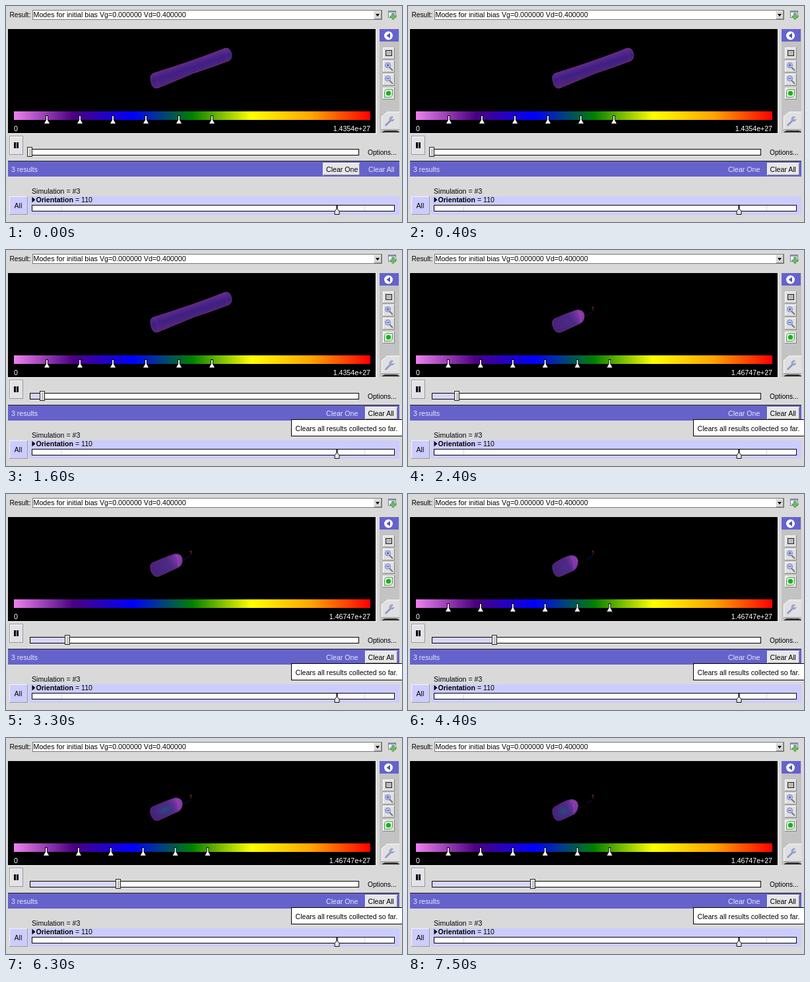
Recreate the animation shown at these times as an HTML page. Size 600 px wide and 328 px high, loop 8000 ms.

```html
<!DOCTYPE html>
<html lang="en">
<head>
<meta charset="utf-8">
<title>Simulation result viewer</title>
<style>
html, body { margin: 0; width: 100%; height: 100%; overflow: hidden; background: #d9d9d9; }
svg { display: block; }
text { font-family: "Liberation Sans", Arial, sans-serif; font-size: 10.6px; fill: #000; }
.px { shape-rendering: crispEdges; }
.small { font-size: 10.2px; }
.light { fill: #e6e6ff; }
.white { fill: #fff; }
.right { text-anchor: end; }
.line { fill: none; stroke: #000; }

/* Hard changes on one shared 8 s clock */
.step { animation: 8s step-end infinite; }
.knob { animation-name: knob; }
.one { animation-name: one; }
.all { animation-name: all; }
.tip { animation-name: tip; }
.rod, .first { animation-name: first; }
.later { animation-name: later; }
.marks { animation-name: marks; }
.long { animation-name: long; }
.short { animation-name: short; }
.teal { animation-name: teal; }

@keyframes knob {
  0% { transform: translateX(0); }
  11.25% { transform: translateX(19px); }
  23.75% { transform: translateX(38px); }
  35% { transform: translateX(57px); }
  45% { transform: translateX(76px); }
  53.75% { transform: translateX(95px); }
  65% { transform: translateX(115px); }
  76.25% { transform: translateX(134px); }
  87.5%, 100% { transform: translateX(153px); }
}
@keyframes one { 0% { visibility: visible; } 5%, 100% { visibility: hidden; } }
@keyframes all { 0% { visibility: hidden; } 5%, 100% { visibility: visible; } }
@keyframes tip { 0% { visibility: hidden; } 11.25%, 100% { visibility: visible; } }
@keyframes first { 0% { visibility: visible; } 23.75%, 100% { visibility: hidden; } }
@keyframes later { 0% { visibility: hidden; } 23.75%, 100% { visibility: visible; } }
@keyframes marks {
  0% { visibility: hidden; }
  23.75% { visibility: visible; }
  35% { visibility: hidden; }
  45%, 100% { visibility: visible; }
}
@keyframes long {
  0% { visibility: hidden; }
  23.75% { visibility: visible; }
  45% { visibility: hidden; }
  65% { visibility: visible; }
  87.5%, 100% { visibility: hidden; }
}
@keyframes short {
  0% { visibility: hidden; }
  45% { visibility: visible; }
  65% { visibility: hidden; }
  87.5%, 100% { visibility: visible; }
}
@keyframes teal { 0% { opacity: .2; } 65%, 100% { opacity: .8; } }
</style>
</head>
<body>
<svg width="600" height="328" viewBox="0 0 600 328">
<defs>
  <linearGradient id="rainbow">
    <stop stop-color="#ee82ee"/>
    <stop offset=".1667" stop-color="#4b0082"/>
    <stop offset=".3333" stop-color="#00f"/>
    <stop offset=".5" stop-color="#008000"/>
    <stop offset=".6667" stop-color="#ff0"/>
    <stop offset=".8333" stop-color="#ffa500"/>
    <stop offset="1" stop-color="#f00"/>
  </linearGradient>
  <linearGradient id="skin" gradientUnits="userSpaceOnUse" x1="277" y1="83" x2="284" y2="104">
    <stop stop-color="#642a8c"/>
    <stop offset=".5" stop-color="#3d2084"/>
    <stop offset="1" stop-color="#54237c"/>
  </linearGradient>
  <linearGradient id="shell" x1="0" y1=".7" x2="1" y2=".3">
    <stop stop-color="#472078"/>
    <stop offset=".6" stop-color="#502587"/>
    <stop offset="1" stop-color="#8e3cae"/>
  </linearGradient>
  <radialGradient id="core">
    <stop stop-color="#1b5a78"/>
    <stop offset="1" stop-color="#2b3b80" stop-opacity="0"/>
  </radialGradient>
  <path id="mark" d="M-.9-11.500h1.800v6L4 0h-8L-.9-5.500z" fill="#fff" stroke="#000" stroke-width="1.800" paint-order="stroke"/>
  <g id="raised" class="px">
    <path d="M0 0H17V17H0z" fill="#e0e0e0"/>
    <path d="M0 17V0H17" fill="none" stroke="#fff"/>
    <path d="M0 17H17V0" fill="none" stroke="#858585"/>
  </g>
  <g id="lens">
    <path d="M10 10l5 5" stroke="#777" stroke-width="2"/>
    <circle cx="7.500" cy="7" r="4" fill="#bcc6f2" stroke="#7780b8"/>
    <path d="M5.500 7h4" stroke="#4f5bac" stroke-width="1.200"/>
  </g>
  <g id="wisp" fill="none">
    <path d="M271 99l7-4 3-2" stroke="#1c1c80" stroke-dasharray="2 1"/>
    <path d="M278.500 87.500l2-1 .5 3-1.500 2" stroke="#9a4712" stroke-width=".9"/>
  </g>
</defs>

<rect width="600" height="328" fill="#d9d9d9"/>

<!-- Result chooser -->
<text class="small" x="5.500" y="17">Result:</text>
<g class="px">
  <rect x="40.500" y="6.500" width="529" height="14" fill="#fff" stroke="#777"/>
  <rect x="558" y="7" width="10" height="13" fill="#d9d9d9"/>
  <path d="M557.500 20V7.500H568" fill="none" stroke="#eee"/>
  <path d="M558 19.500H568.500V7" fill="none" stroke="#888"/>
</g>
<path d="M560 12h6l-3 4z"/>
<text x="41.500" y="17" font-size="10.700" style="font-size:10.7px">Modes for initial bias Vg=0.000000 Vd=0.400000</text>
<rect x="579.500" y="7.500" width="11" height="10" fill="#fff" stroke="#777c9c"/>
<path d="M580 9h10" stroke="#9298c8" stroke-width="2"/>
<path d="M584.500 11h4v4h3.500l-5.500 6-5.500-6h3.500z" fill="#6cbb60" stroke="#3a8a38" stroke-width=".7"/>

<!-- Viewer -->
<rect x="3" y="35" width="557" height="158"/>
<path class="px" d="M3 193.500H560.500V35" fill="none" stroke="#f4f4f4"/>

<g class="step rod">
  <path d="M224 102Q256 92 283 82.500Q310 73 331 64.500Q339 62 341.500 72Q343 80 338 83Q312 93 284 102Q258 113 230 124.500Q222 127 219.500 114Q217 104 224 102Z" fill="url(#skin)" stroke="#74357f" stroke-width=".9"/>
  <path d="M331 66Q336 73 335 83M225 103Q231 112 231 123" fill="none" stroke="#7c3a9c" stroke-opacity=".35"/>
</g>
<g class="step long">
  <path d="M222 104.500Q244 95 256 91Q265 90 267 98Q268 107 262 111L231 125Q223 127 219.500 116Q217 107 222 104.500Z" fill="url(#shell)" stroke="#66327c" stroke-width=".9"/>
  <ellipse class="step teal" cx="241" cy="109" rx="19" ry="10" fill="url(#core)" transform="rotate(-21 241 109)"/>
  <path d="M257 93Q263 99 261 109" fill="none" stroke="#a84cc0" stroke-opacity=".4" stroke-width="3"/>
  <path d="M267 101l5-2" stroke="#5c1818" stroke-dasharray="1 1"/>
  <use href="#wisp"/>
</g>
<g class="step short">
  <path d="M222 105Q236 96 246 93.500Q256 92.500 257.500 101Q258 110 252 115.500L231 125Q223 127.500 220 117Q217 108 222 105Z" fill="url(#shell)" stroke="#66327c" stroke-width=".9"/>
  <ellipse class="step teal" cx="236" cy="111" rx="16" ry="11" fill="url(#core)" transform="rotate(-21 236 111)"/>
  <path d="M247 95.500Q254 103 251.500 113.500" fill="none" stroke="#a250b8" stroke-opacity=".35" stroke-width="3"/>
  <path d="M259 107l9-4" stroke="#501414" stroke-dasharray="1 2"/>
  <use href="#wisp"/>
</g>

<rect class="px" x="12" y="160" width="540" height="13" fill="url(#rainbow)"/>
<g id="early" class="step first"></g>
<g id="late" class="step marks"></g>
<text class="white" x="12" y="190">0</text>
<text class="white right step first" x="552" y="190">1.4354e+27</text>
<text class="white right step later" x="552" y="190">1.46747e+27</text>

<!-- Side tools -->
<g class="px">
  <rect x="566" y="35" width="30" height="158" fill="#c3c3c3"/>
  <rect x="566" y="35" width="29" height="19" fill="#6563cb"/>
</g>
<circle cx="579.500" cy="45" r="6.500" fill="#fff"/>
<path d="M582 41v8l-5.500-4z" fill="#5351b8"/>
<use href="#raised" x="571" y="63"/>
<use href="#raised" x="571" y="83"/>
<use href="#raised" x="571" y="103"/>
<use href="#raised" x="571" y="124"/>
<rect class="px" x="575.500" y="67.500" width="9" height="8" fill="#bbb" stroke="#222"/>
<use href="#lens" x="571" y="83"/>
<path d="M578.500 88v4" stroke="#4f5bac" stroke-width="1.200"/>
<use href="#lens" x="571" y="103"/>
<path d="M573.500 129.500l3-3h9v9l-3 3h-9z" fill="#d9efd9" stroke="#468546" stroke-width=".8"/>
<circle cx="579.500" cy="132.500" r="3.600" fill="#13b51b"/>
<path d="M569 187V168l8-7h19v26z" fill="#e0e0e0"/>
<path d="M569.500 187V168l8-7H596" fill="none" stroke="#fff"/>
<path d="M569 187.500H596" stroke="#999"/>
<path d="M575.500 181l8-8" stroke="#8d98c6" stroke-width="2.600" stroke-linecap="round"/>
<path d="M586.500 168.500a3.500 3.500 0 1 0 1.500 3.500l-3 1-1.500-1.500z" fill="#a0abd6" stroke="#7d88b6" stroke-width=".6"/>
<path d="M570 192v-1l4-2h18l4 2v1z" fill="#333"/>

<!-- Playback -->
<g class="px">
  <rect x="5.500" y="197.500" width="20" height="28" fill="#e2e2e8" stroke="#999"/>
  <path d="M6.500 225V198.500H25" fill="none" stroke="#fff"/>
  <path d="M12 207h2.500v9H12zM16 207h2.500v9H16z"/>
  <rect x="36.500" y="217.500" width="498" height="9" fill="#fff"/>
  <svg x="37" y="218" width="498" height="8">
    <rect class="step knob" x="-200" width="200" height="8" fill="#d6d6fb"/>
  </svg>
  <rect class="line" x="36.500" y="217.500" width="498" height="9"/>
  <g class="step knob">
    <rect x="32.500" y="214.500" width="7" height="14" fill="#d9d9d9" stroke="#222"/>
    <path d="M33.500 228V215.500H39" fill="none" stroke="#fff"/>
    <path d="M36.500 217V227" stroke="#aaa"/>
  </g>
</g>
<text class="small" x="548" y="226">Options...</text>

<!-- Result bar -->
<g class="px">
  <rect x="3" y="236" width="593" height="23" fill="#6563cb"/>
  <rect x="3" y="235" width="593" height="1" fill="#222"/>
</g>
<text class="light" x="8" y="252">3 results</text>
<text class="light" x="485" y="252">Clear One</text>
<text class="light" x="549" y="252">Clear All</text>
<g class="step one">
  <rect class="px" x="480.500" y="238.500" width="55" height="18" fill="#e7e7e7" stroke="#fff"/>
  <path class="px" d="M481 256.500H535.500V239" fill="none" stroke="#888"/>
  <text x="485" y="252">Clear One</text>
</g>
<g class="step all">
  <rect class="px" x="544.500" y="238.500" width="48" height="18" fill="#e7e7e7" stroke="#fff"/>
  <path class="px" d="M545 256.500H592.500V239" fill="none" stroke="#888"/>
  <text x="548.500" y="252">Clear All</text>
</g>

<!-- Parameters -->
<text x="39" y="285">Simulation = #3</text>
<g class="px">
  <rect x="35" y="289" width="561" height="28" fill="#ccccff"/>
  <rect x="5.500" y="289.500" width="27" height="27" fill="#ccccff" stroke="#999"/>
  <path d="M5.500 316V289.500H32" fill="none" stroke="#f4f4ff"/>
  <rect x="39.500" y="302.500" width="549" height="9" fill="#fff" stroke="#000"/>
  <path d="M84.500 303V311M543.500 303V311" stroke="#d3d3e8"/>
</g>
<text x="12.500" y="307">All</text>
<path d="M39.500 290v8.500l5-4.250z"/>
<text x="45.500" y="298"><tspan font-weight="bold">Orientation</tspan> = 110</text>
<path d="M501.500 303V309" stroke="#000" stroke-width="2"/>
<path d="M498 316.500V311.500L501.500 307.500 505 311.500V316.500z" fill="#e4e4e4" stroke="#111"/>

<g class="step tip">
  <rect class="px" x="432.500" y="257.500" width="170" height="25" fill="#fff" stroke="#000"/>
  <text x="438.500" y="274.500">Clears all results collected so far.</text>
</g>
</svg>
<script>
const addMarks = (id, x, gap) => {
  document.getElementById(id).innerHTML = Array.from({ length: 6 }, (_, i) =>
    `<use href="#mark" x="${x + i * gap}" y="178.500"/>`).join("");
};
addMarks("early", 62, 50);
addMarks("late", 61, 48.9);
</script>
</body>
</html>
```
